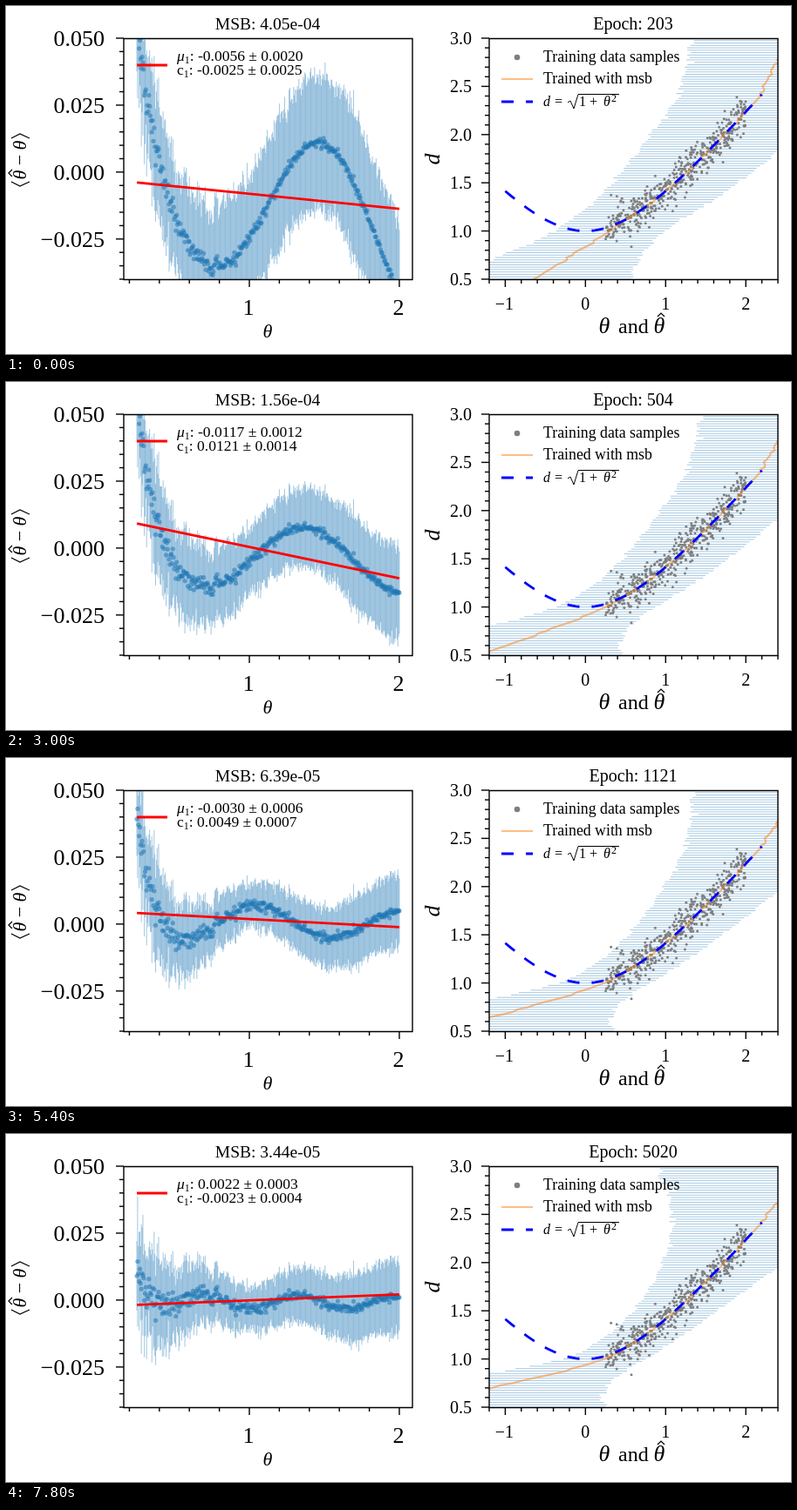
An HTML page with a canvas for the animation above (8000 ms loop, 900x400 px).

```html
<!DOCTYPE html>
<html lang="en">
<head>
<meta charset="utf-8">
<style>
html, body { margin: 0; width: 100%; height: 100%; overflow: hidden; background: #fff; }
canvas { display: block; }
</style>
</head>
<body>
<canvas id="stage" width="900" height="400"></canvas>
<script>
const ctx = document.getElementById('stage').getContext('2d');
const LOOP = 8000, STEP = 200, LAST_STEP = 39;
const BLUE = '#1f77b4', ORANGE = '#ff7f0e', GRAY = '#7f7f7f';
const TOP = 37, BOTTOM = 314, WIDTH = 331, LEFT = 135, RIGHT = 554;

// Data to pixels
const biasX = t => LEFT + (t - 0.1625) * WIDTH / 1.925;
const biasY = v => TOP + (0.05 - v) * 277 / 0.09;
const fitX = t => RIGHT + (t + 1.2) * WIDTH / 3.6;
const fitY = d => TOP + (3 - d) * 277 / 2.5;

// Key moments of the training; wave and half are the bias ripple's height and half period in pixels
const stages = [
  { step: 0, epoch: 203, msb: 4.05e-4, slope: -0.0056, error: 0.00204, intercept: -0.0025, wave: 62, half: 120 },
  { step: 6, epoch: 335, msb: 3.06e-4, slope: -0.0038, error: 0.00186, intercept: 0.0034, wave: 59, half: 120 },
  { step: 15, epoch: 504, msb: 1.56e-4, slope: -0.0117, error: 0.00117, intercept: 0.0121, wave: 33, half: 113 },
  { step: 22, epoch: 744, msb: 8.22e-5, slope: -0.0027, error: 0.00068, intercept: -0.0027, wave: 26, half: 89 },
  { step: 27, epoch: 1121, msb: 6.39e-5, slope: -0.0030, error: 0.00058, intercept: 0.0049, wave: 22, half: 86 },
  { step: 34, epoch: 2903, msb: 4.24e-5, slope: -0.0014, error: 0.0004, intercept: 0.0039, wave: 15, half: 73 },
  { step: 39, epoch: 5020, msb: 3.44e-5, slope: 0.0022, error: 0.0003, intercept: -0.0023, wave: 10, half: 55 }
];

const mix = (a, b, k) => a + (b - a) * k;
const mixLog = (a, b, k) => a * (b / a) ** k;
const clamp = v => Math.min(1, Math.max(0, v));
const smooth = v => v * v * (3 - 2 * v);

function stateAt(step) {
  const i = Math.max(1, stages.findIndex(s => s.step >= step));
  const a = stages[i - 1], b = stages[i];
  const k = (step - a.step) / (b.step - a.step);
  const state = {};
  for (const key in a) state[key] = (key === 'epoch' || key === 'msb' ? mixLog : mix)(a[key], b[key], k);
  state.progress = step / LAST_STEP;
  state.early = 1 - smooth(clamp(state.progress / 0.6));
  return state;
}

// Bias: a steep start that settles into a ripple about the regression line
function biasCurve({ slope, intercept, wave, half, progress, early }) {
  const middle = biasY(intercept + slope * 1.125) + 3 + 20 * early;
  const trough = 118 + 0.97 * half;
  const growth = 0.8 * Math.sqrt(early) - 0.3;
  const lift = 190 - 150 * progress ** 2;
  const decay = 15 + 8 * early;
  return x => {
    const u = x - trough;
    return middle + wave * Math.exp(growth * u / 200) * Math.cos(Math.PI * u / half)
      - lift * Math.exp((150 - x) / decay);
  };
}
function biasSpread({ progress, early }) {
  const start = 60 - 10 * progress, middle = 25 + 47 * early, end = 44 + 41 * early;
  return x => x < 280
    ? mix(start, middle, smooth((x - 150) / 130))
    : mix(middle, end, (x - 280) / 171);
}

// Fit: follows the true curve between LOW and HIGH and strays outside
const LOW = 245, HIGH = 105;
const below = y => Math.max(0, (y - LOW) / (BOTTOM - LOW));
const above = y => Math.max(0, (HIGH - y) / (HIGH - TOP));
const tail = progress => 105 + 167 * progress;

function fitCurve({ progress }) {
  return y => {
    const d = 3 - (Math.min(LOW, Math.max(HIGH, y)) - TOP) * 2.5 / 277;
    return fitX(Math.sqrt(d * d - 1))
      - tail(progress) * below(y) ** (1.05 + 0.4 * progress)
      + (33 + 20 * progress) * above(y);
  };
}
function fitReach({ progress }) {
  const base = 63 - 20 * progress;
  const bottom = tail(progress) + 8 - 28 * progress;
  return y => y > LOW
    ? mix(base, bottom, below(y) ** 2.2)
    : base + (45 + 80 * progress ** 3) * ((LOW - y) / (LOW - TOP)) ** (1 + progress);
}

let seed = 20;
const random = () => (seed = (seed * 1664525 + 1013904223) % 4294967296) / 4294967296;
const gauss = () => Math.sqrt(-2 * Math.log(1 - random())) * Math.cos(2 * Math.PI * random());

const points = Array.from({ length: 351 }, (_, i) => {
  const theta = 0.25 + i * 0.005, rough = Math.exp((0.25 - theta) / 0.5);
  return {
    x: biasX(theta),
    shift: gauss() * (2 + 7.5 * rough),
    stretch: 1 + gauss() * (0.08 + 0.12 * rough)
  };
});
const rows = Array.from({ length: 101 }, (_, i) => {
  const y = fitY(3 - i * 0.025);
  return { y, shift: gauss() * (y > 262 || y < HIGH ? 1.7 : 0.8), stretch: 1 + gauss() * 0.02 };
});
const samples = Array.from({ length: 500 }, () => {
  const theta = 0.25 + 1.75 * random();
  return [fitX(theta), fitY(Math.sqrt(1 + theta * theta) + 0.1 * gauss())];
});

function text(s, x, y, size, align = 'left', style = '') {
  ctx.font = `${style} ${size}px "Liberation Serif", "Noto Serif", serif`;
  ctx.textAlign = align;
  ctx.fillStyle = '#000';
  ctx.fillText(s, x, y);
  return x + ctx.measureText(s).width;
}
const italic = (s, x, y, size, align) => text(s, x, y, size, align, 'italic');

function stroke(color, width, alpha = 1, dash = []) {
  ctx.strokeStyle = color;
  ctx.lineWidth = width;
  ctx.globalAlpha = alpha;
  ctx.setLineDash(dash);
  ctx.stroke();
  ctx.globalAlpha = 1;
  ctx.setLineDash([]);
}
function path(pts, color = '#000', width = 1.4, alpha = 1, dash = []) {
  ctx.beginPath();
  pts.forEach(([x, y]) => ctx.lineTo(x, y));
  stroke(color, width, alpha, dash);
}
function dot(x, y, r, color, alpha = 1) {
  ctx.globalAlpha = alpha;
  ctx.fillStyle = color;
  ctx.beginPath();
  ctx.arc(x, y, r, 0, 2 * Math.PI);
  ctx.fill();
  ctx.globalAlpha = 1;
}
function clipped(left, draw) {
  ctx.save();
  ctx.beginPath();
  ctx.rect(left, TOP, WIDTH, BOTTOM - TOP);
  ctx.clip();
  draw();
  ctx.restore();
}
function rotated(x, y, draw) {
  ctx.save();
  ctx.translate(x, y);
  ctx.rotate(-Math.PI / 2);
  draw();
  ctx.restore();
}
const hat = (x, y) => path([[x - 4, y + 4], [x, y], [x + 4, y + 4]], '#000', 1.2);

function ticksX(scale, from, to) {
  for (let i = from; i <= to; i++) {
    const x = scale(i / 5);
    path([[x, BOTTOM], [x, BOTTOM + (i % 5 ? 5 : 9)]]);
  }
}
function ticksY(scale, unit, from, to, left) {
  for (let i = from; i <= to; i++) {
    const y = scale(i * unit);
    path([[left, y], [left - (i % 5 ? 5 : 9), y]]);
  }
}
const signed = (v, digits) => v.toFixed(digits).replace('-', '−');

function drawAxes() {
  for (const left of [LEFT, RIGHT]) {
    ctx.beginPath();
    ctx.rect(left, TOP + 0.5, WIDTH, BOTTOM - TOP);
    stroke('#000', 1.4);
  }
  ticksX(biasX, 1, 10);
  ticksY(biasY, 0.005, -8, 10, LEFT);
  ticksX(fitX, -6, 12);
  ticksY(fitY, 0.1, 5, 30, RIGHT);
  for (const v of [1, 2]) text(v, biasX(v) - 1, 355, 26, 'center');
  for (let i = -1; i <= 2; i++) {
    text(signed(i * 0.025, 3), 113, biasY(i * 0.025) + 9, 26, 'right');
    text(signed(i, 0), fitX(i) - (i < 0 ? 1 : 0), 349, 20, 'center');
  }
  for (let v = 0.5; v <= 3; v += 0.5) text(v.toFixed(1), 534, fitY(v) + 7, 20, 'right');

  italic('θ', 300, 381, 22, 'center');
  rotated(23, 177, () => {
    for (const side of [-1, 1]) {
      path([[25 * side, -17], [30 * side, -7], [25 * side, 4]], '#000', 1.2);
      italic('θ', 17 * side, 0, 22, 'center');
    }
    hat(-15, -20);
    text('−', 0, 0, 22, 'center');
  });
  rotated(497, 176, () => italic('d', 0, 0, 26, 'center'));
  italic('θ', 686, 376, 26, 'center');
  text('and', 702, 376, 24);
  italic('θ', 749, 376, 26, 'center');
  hat(751, 353);
}

function drawLegends({ slope, error, intercept }) {
  path([[150, 68], [185, 68]], 'red', 2.8);
  const entry = (name, style, y, value, deviation) => {
    let x = text(name, 196, y, 17.5, 'left', style);
    x = text('1', x, y + 3, 12);
    text(`: ${value.toFixed(4)} ± ${deviation.toFixed(4)}`, x, y, 17.5);
  };
  entry('μ', 'italic', 63, slope, error);
  entry('c', '', 79, intercept, error * 1.23);

  dot(586, 59, 3.3, GRAY);
  path([[568, 84], [604, 84]], ORANGE, 2.1, 0.5);
  path([[568, 110], [604, 110]], 'blue', 2.8, 1, [14, 14]);
  text('Training data samples', 616, 64, 17.8);
  text('Trained with msb', 616, 89, 17.8);
  italic('d', 616, 115, 16);
  text('=', 629, 115, 16);
  path([[644, 111], [647, 109], [651, 118], [656, 101.5], [703, 101.5]], '#000', 1);
  text('1', 657, 115, 16);
  text('+', 669, 115, 16);
  italic('θ', 685, 115, 16);
  text('2', 694, 110, 12);
}

function drawBias(state) {
  const center = biasCurve(state), spread = biasSpread(state);
  clipped(LEFT, () => {
    const marks = points.map(p => [p.x, center(p.x) + p.shift, spread(p.x) * p.stretch]);
    ctx.beginPath();
    for (const [x, y, h] of marks) {
      ctx.moveTo(x, y - h);
      ctx.lineTo(x, y + h);
    }
    stroke(BLUE, 0.7, 0.6);
    for (const [x, y] of marks) dot(x, y, 2.6, BLUE, 0.55);
    path([0.25, 2].map(t => [biasX(t), biasY(state.intercept + state.slope * t)]), 'red', 2.8);
  });
}

function drawFit(state) {
  const center = fitCurve(state), reach = fitReach(state);
  clipped(RIGHT, () => {
    const line = rows.map(r => [center(r.y) + r.shift, r.y]);
    ctx.beginPath();
    rows.forEach((r, i) => {
      const h = reach(r.y) * r.stretch;
      ctx.moveTo(line[i][0] - h, r.y);
      ctx.lineTo(line[i][0] + h, r.y);
    });
    stroke(BLUE, 0.8, 0.5);
    for (const [x, y] of samples) dot(x, y, 1.5, GRAY);
    path(line, ORANGE, 2.1, 0.5);
    const truth = Array.from({ length: 81 }, (_, i) => -1 + i * 0.04);
    path(truth.map(t => [fitX(t), fitY(Math.sqrt(1 + t * t))]), 'blue', 2.8, 1, [14, 14]);
  });
}

function draw(time) {
  const state = stateAt(Math.floor(time % LOOP / STEP));
  ctx.fillStyle = '#fff';
  ctx.fillRect(0, 0, 900, 400);
  drawBias(state);
  drawFit(state);
  drawAxes();
  drawLegends(state);
  text('MSB: ' + state.msb.toExponential(2).replace('e-', 'e-0'), 300, 27, 19.5, 'center');
  text('Epoch: ' + Math.round(state.epoch), 719, 27, 20, 'center');
}

const start = performance.now();
function tick() {
  draw(performance.now() - start);
  requestAnimationFrame(tick);
}
tick();
</script>
</body>
</html>
```
